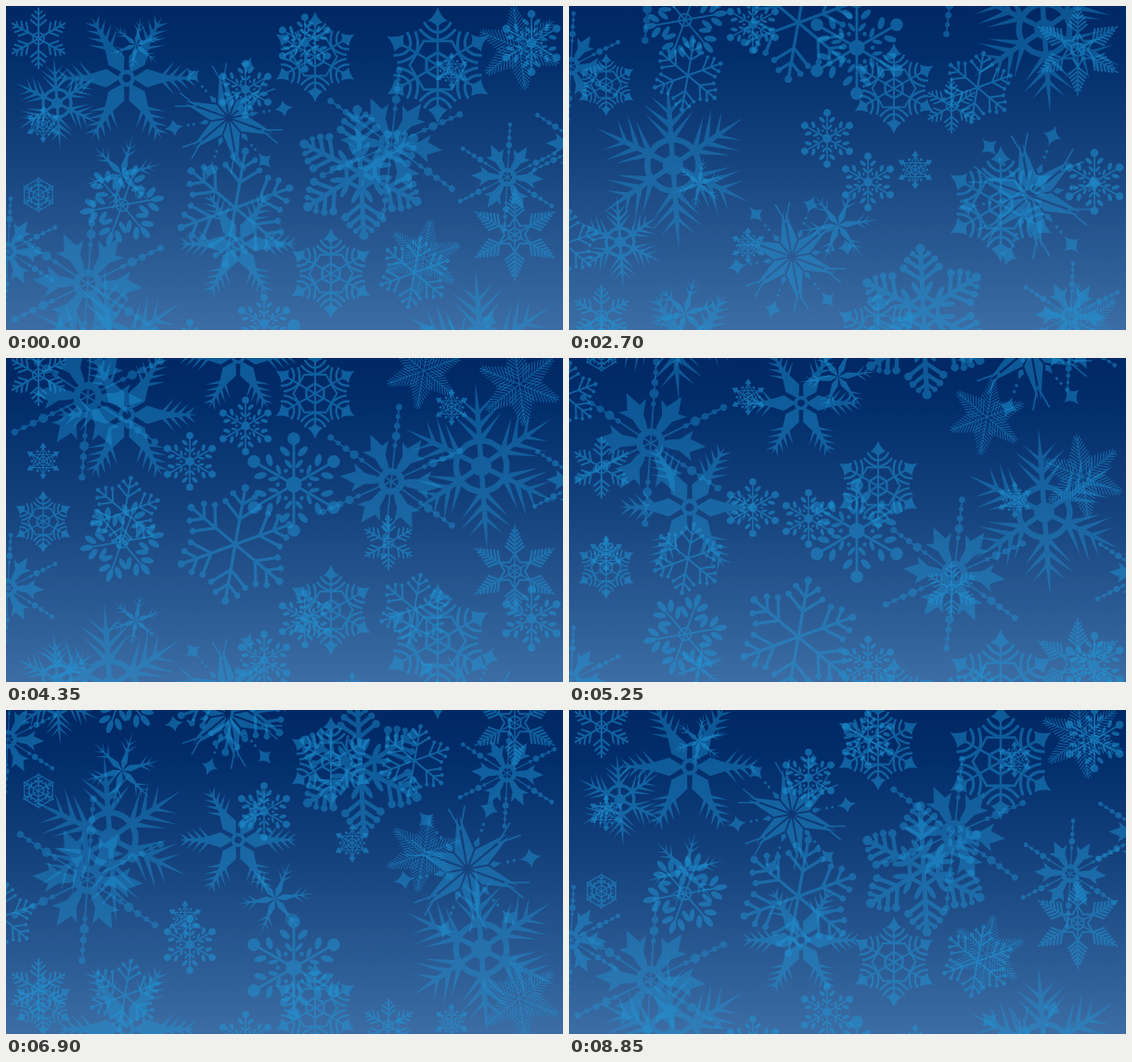
Animation, 600 px wide and 350 px high, one loop 9000 ms. Source, as an HTML page:

```html
<!DOCTYPE html>
<html lang="en">
<head>
<meta charset="utf-8">
<title>Falling snowflakes</title>
<style>
  html, body { margin: 0; width: 100%; height: 100%; overflow: hidden; background: #002a68; }
  svg { display: block; width: 100vw; height: 100vh; }
</style>
</head>
<body>
<svg id="stage" viewBox="0 0 600 350" preserveAspectRatio="none"></svg>
<script>
const LOOP = 9000, STEP = 150, TILE = 500;
const COLOR = '#2098d8';

// Shape helpers; every flake has radius 100 and its first arm points up.
const line = (d, w) => `<path d="${d}" fill="none" stroke="${COLOR}" stroke-width="${w}"/>`;
const fill = d => `<path d="${d}" fill="${COLOR}"/>`;
const dot = (x, y, r) => `<circle cx="${x}" cy="${y}" r="${r}" fill="${COLOR}"/>`;
const ring = (r, w) => `<circle r="${r}" fill="none" stroke="${COLOR}" stroke-width="${w}"/>`;
const oval = (x, y, rx, ry, angle = 0) =>
  `<ellipse rx="${rx}" ry="${ry}" fill="${COLOR}" transform="translate(${x} ${y}) rotate(${angle})"/>`;
const turn = (angle, body) => `<g transform="rotate(${angle})">${body}</g>`;
const mirror = body => body + `<g transform="scale(-1 1)">${body}</g>`;
const six = arm => [0, 60, 120, 180, 240, 300].map(a => turn(a, arm)).join('');
const spine = (len, w) => line(`M0 0V${-len}`, w);
const twig = (y, dx, dy, w) => mirror(line(`M0 ${-y}l${dx} ${-dy}`, w));
const knob = (y, dx, dy, w, r) => twig(y, dx, dy, w) + mirror(dot(dx, -y - dy, r));
const spike = (y, dx, dy, w) => mirror(fill(`M0 ${-y}L${dx} ${-y - dy}L0 ${-y - w}Z`));
const leaves = (x, y, rx, ry, angle) => mirror(oval(x, -y, rx, ry, angle));
const hexSide = (r, w) => line(`M0 ${-r}L${r * 0.866} ${-r / 2}`, w);
const many = (count, make) => Array.from({ length: count }, (_, i) => make(i)).join('');

const shapes = {
  needle: ring(30, 7) + ring(9, 6) + six(fill('M-3 0L-3 -60L0 -100L3 -60L3 0Z')
    + spike(24, 28, 38, 11) + spike(42, 30, 32, 9) + spike(58, 20, 24, 7)),

  lace: six(spine(74, 4) + fill('M0 -100Q5 -84 17 -76Q7 -74 0 -66Q-7 -74 -17 -76Q-5 -84 0 -100')
    + mirror(line('M0 -56Q15 -58 23 -74M0 -42Q18 -46 31 -62', 5))
    + hexSide(22, 5) + turn(30, line('M-20 -36L0 -48L20 -36', 4))),

  bead: ring(13, 8) + six(spine(95, 2) + dot(0, -58, 5.5) + dot(0, -46, 3) + dot(0, -71, 4)
    + dot(0, -83, 3) + dot(0, -95, 4)
    + turn(30, fill('M0 -10L5 -20L7 -34L18 -49L8 -46L0 -65L-8 -46L-18 -49L-7 -34L-5 -20Z'))),

  star: six(mirror(fill('M1.5 -6L15 -29L2 -84Z') + line('M0 -62L13 -98', 2.5))
    + turn(30, fill('M0 -117Q3 -103 15 -100Q3 -97 0 -83Q-3 -97 -15 -100Q-3 -103 0 -117')
      + dot(0, -64, 2.5) + dot(0, -74, 2.5) + fill('M0 -36L5 -42L0 -54L-5 -42Z'))),

  ball: dot(0, 0, 15) + six(spine(85, 5) + dot(0, -87, 12)
    + leaves(17, 63, 6, 12, 45) + leaves(10, 39, 4, 10, 40) + turn(30, dot(0, -30, 4))),

  stick: six(spine(92, 5) + dot(0, -94, 6)
    + knob(42, 28, 25, 5, 5) + knob(66, 18, 16, 5, 5)),

  branch: six(spine(92, 7) + dot(0, -93, 7) + hexSide(24, 6) + leaves(9, 34, 4, 12, 30)
    + knob(46, 26, 19, 6, 6) + knob(62, 20, 15, 6, 5) + knob(77, 12, 9, 5, 4)),

  fern: ring(9, 6) + six(fill('M0 -8L13 -29L5 -55L0 -100L-5 -55L-13 -29Z')
    + many(4, i => spike(44 + i * 12, 24 - i * 4, 24 - i * 2, 8))),

  plume: six(spine(100, 3) + hexSide(15, 4) + line('M0 -38L11 -19L33 -19', 4)
    + many(6, i => twig(38 + i * 9, 21 - i * 3, 17 - i * 2, 4.5))),

  feather: six(spine(100, 2.5) + many(10, i => twig(12 + i * 8, 30 - i * 2.5, 22 - i, 2.2))),

  leaf: six(spine(76, 4) + hexSide(16, 4) + oval(0, -84, 7, 16)
    + leaves(17, 72, 7, 15, 42) + leaves(20, 49, 6, 15, 50)),

  twig: six(spine(98, 6) + hexSide(20, 5) + twig(38, 26, 22, 6)
    + twig(58, 22, 18, 6) + twig(76, 13, 12, 5)),

  pointy: six(fill('M0 0L8 -22L3 -50L0 -100L-3 -50L-8 -22Z')
    + spike(44, 22, 28, 8) + spike(62, 16, 22, 6)),

  gem: six(spine(72, 6) + line('M0 -72L62 36', 5) + hexSide(26, 6)
    + fill('M0 -100L17 -74L0 -66L-17 -74Z') + turn(30, dot(0, -60, 7))),

  hex: six(spine(96, 6) + hexSide(32, 7) + hexSide(58, 7) + hexSide(88, 6)
    + twig(42, 22, 18, 6) + twig(65, 18, 14, 6)),
};

// kind, x, y at the loop start, radius, rotation
const layers = [
  { id: 'far', turns: 1, flakes: [
    ['needle', 55, 105, 50, -4], ['needle', 512, 375, 91, -4], ['star', 240, 121, 60, -10],
    ['lace', 465, 64, 63], ['ball', 322, 40, 32], ['branch', 382, 180, 73, -3],
    ['bead', 88, 300, 92, 4], ['bead', 540, 185, 60, 3], ['fern', 250, 257, 64, 30],
    ['ball', 566, 40, 36], ['feather', 450, 272, 42, 10], ['twig', 412, 458, 30],
    ['lace', 40, 435, 34], ['pointy', 140, 42, 31, 10], ['hex', 35, 204, 20],
    ['ball', 198, 370, 32], ['ball', 310, 395, 57], ['pointy', 125, 182, 43, 15],
    ['stick', 128, 425, 40, 10],
  ] },
  { id: 'near', turns: 2, flakes: [
    ['fern', 130, 78, 76, 30], ['lace', 333, 55, 49], ['ball', 258, 90, 32],
    ['bead', 415, 150, 85, 6], ['bead', 2, 265, 60, 3], ['bead', 622, 150, 62, 3],
    ['plume', 548, 247, 50], ['feather', 553, 45, 46, -8], ['stick', 440, 288, 40, 10],
    ['stick', 247, 218, 66, 10], ['lace', 350, 289, 49], ['leaf', 125, 215, 46, 20],
    ['gem', 480, 70, 20], ['gem', 373, 377, 21], ['gem', 40, 128, 20],
    ['gem', 193, 459, 20], ['twig', 35, 35, 34], ['stick', -5, 457, 38, 10],
    ['ball', 278, 343, 32], ['pointy', 290, 437, 43, 22], ['star', 497, 405, 69, -10],
    ['needle', 112, 372, 92, -4],
  ] },
];

// Large flakes are fainter than small ones.
const opacity = r => 0.58 - r * 0.002;
const drawFlake = ([kind, x, y, r, angle = 0]) =>
  `<use href="#${kind}" opacity="${opacity(r)}" transform="translate(${x} ${y}) rotate(${angle}) scale(${r / 100})"/>`;

const stage = document.getElementById('stage');
stage.innerHTML = `<defs>
  <linearGradient id="sky" x2="0" y2="1">
    <stop stop-color="#002864"/><stop offset=".15" stop-color="#022d6b"/>
    <stop offset=".5" stop-color="#174580"/><stop offset="1" stop-color="#3c6da4"/>
  </linearGradient>
  ${Object.entries(shapes).map(([id, body]) => `<g id="${id}">${body}</g>`).join('')}
  ${layers.map(l => `<g id="${l.id}-tile">${l.flakes.map(drawFlake).join('')}</g>`).join('')}
</defs>
<rect width="600" height="350" fill="url(#sky)"/>
${layers.map(l => `<g id="${l.id}">${many(3, i => `<use href="#${l.id}-tile" y="${-i * TILE}"/>`)}</g>`).join('')}`;

for (const layer of layers) layer.node = document.getElementById(layer.id);

let shown = -1;
function render(time) {
  const step = Math.floor((time % LOOP) / STEP);
  if (step === shown) return;
  shown = step;
  for (const { node, turns } of layers) {
    const shift = (step * STEP / LOOP * turns * TILE) % TILE;
    node.setAttribute('transform', `translate(0 ${shift})`);
  }
}

const start = performance.now();
function tick() {
  render(performance.now() - start);
  requestAnimationFrame(tick);
}
tick();
</script>
</body>
</html>
```
